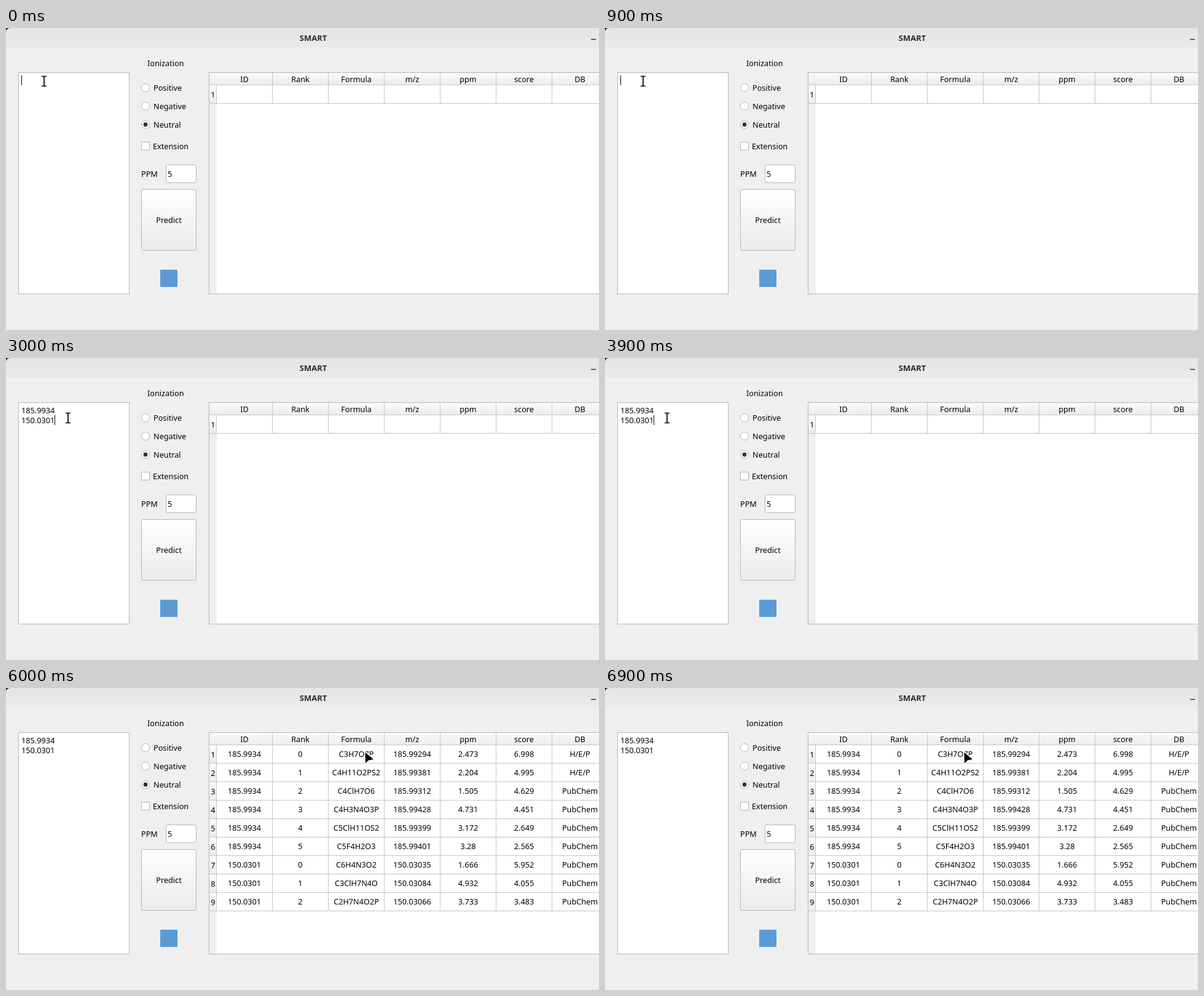
An HTML page that plays this animation: 965x491 px, repeating every 7500 ms.

```html
<!DOCTYPE html>
<html lang="en">
<head>
<meta charset="utf-8">
<title>Formula prediction</title>
<style>
  html, body { margin: 0; width: 100%; height: 100%; overflow: hidden; background: #efefef; }
  svg { display: block; }
  text { font: 12.7px "Noto Sans", "Open Sans", sans-serif; fill: #000; white-space: pre; }
  .mid { text-anchor: middle; }
  .title { font-weight: 700; font-size: 13px; fill: #2b2b2b; }
  .box { fill: #fff; stroke: #b5b5b5; }
  .grid { fill: none; stroke: #c6c6c6; }
</style>
</head>
<body>
<svg id="stage" width="965" height="491" viewBox="0 0 965 491">
  <defs>
    <linearGradient id="bar" x2="0" y2="1"><stop stop-color="#e5e5e5"/><stop offset="1" stop-color="#eaeaea"/></linearGradient>
    <linearGradient id="button" x2="0" y2="1"><stop stop-color="#fff"/><stop offset="1" stop-color="#ebebeb"/></linearGradient>
    <linearGradient id="hover" x2="0" y2="1"><stop stop-color="#fff"/><stop offset="1" stop-color="#f3f3f3"/></linearGradient>
    <linearGradient id="head" x2="0" y2="1"><stop stop-color="#fbfbfb"/><stop offset="1" stop-color="#ebebeb"/></linearGradient>
  </defs>
  <rect width="965" height="491" fill="#efefef"/>
  <rect width="8" height="8" fill="#111"/>
  <path d="M0 32V7Q0 0 7 0H965V32Z" fill="url(#bar)"/>
  <path d="M952 18.5h8" stroke="#2b2b2b" stroke-width="1.4"/>
  <rect class="box" x="20.5" y="72.5" width="180" height="360"/>
  <rect class="box" x="220.5" y="185.5" width="13" height="13"/>
  <rect class="box" x="260.5" y="222.5" width="49" height="29" rx="2"/>
  <rect class="box" id="predict" x="220.5" y="262.5" width="89" height="99" rx="2.5"/>
  <rect x="251" y="393" width="28" height="28" fill="#5b9bd5"/>
  <rect class="box" x="330.5" y="72.5" width="640" height="360"/>
  <rect x="331" y="73" width="634" height="20" fill="url(#head)"/>
  <rect x="331" y="93" width="12" height="339" fill="#efefef"/>
  <g id="labels"></g>
  <g id="table"></g>
  <g id="typed"></g>
  <path id="caret" d="M.5 0v16" stroke="#000"/>
  <path id="beam" d="M-4-7.5h3l1 1 1-1h3M0-6.5V7.5M-4 8.5h3l1-1 1 1h3" fill="none" stroke="#000" stroke-width="1.7"/>
  <path id="arrow" d="M0 0L.5 18 5.5 13 13.5 11.5Z" fill="#000" stroke="#fff" stroke-width="3" stroke-linejoin="round" paint-order="stroke"/>
</svg>
<script>
const $ = id => document.getElementById(id);
const label = (text, x, y, cls = "") => `<text x="${x}" y="${y}" class="${cls}">${text}</text>`;
const columnX = i => 388 + 91 * i;

const columns = ["ID", "Rank", "Formula", "m/z", "ppm", "score", "DB"];
const masses = ["185.9934", "150.0301"];
const results = `0 0 C3H7O7P 185.99294 2.473 6.998 H/E/P
0 1 C4H11O2PS2 185.99381 2.204 4.995 H/E/P
0 2 C4ClH7O6 185.99312 1.505 4.629 PubChem
0 3 C4H3N4O3P 185.99428 4.731 4.451 PubChem
0 4 C5ClH11OS2 185.99399 3.172 2.649 PubChem
0 5 C5F4H2O3 185.99401 3.28 2.565 PubChem
1 0 C6H4N3O2 150.03035 1.666 5.952 PubChem
1 1 C3ClH7N4O 150.03084 4.932 4.055 PubChem
1 2 C2H7N4O2P 150.03066 3.733 3.483 PubChem`.split("\n").map(line => {
  const [mass, ...rest] = line.split(" ");
  return [masses[mass], ...rest];
});

// caret, beam and arrow are positions; a missing one is hidden
const steps = [
  { lines: 0, caret: [25, 77], beam: [62, 86] },
  { lines: 1, caret: [79, 77], beam: [122, 86] },
  { lines: 2, caret: [79, 93], beam: [101, 97] },
  { lines: 2, caret: [79, 93], arrow: [276.5, 325], hover: true },
  { lines: 2, arrow: [584.5, 104.5], done: true }
];

function radio(name, y, checked) {
  const dot = checked ? `<circle cx="227" cy="${y}" r="3.4" fill="#333"/>` : "";
  return `<circle class="box" cx="227" cy="${y}" r="6.6"/>${dot}` + label(name, 240, y + 5);
}

function table(rows) {
  const bottom = 92.5 + 30 * rows.length;
  let lines = "M331 92.5H965M342.5 93V" + bottom;
  columns.forEach((_, i) => lines += `M${433.5 + 91 * i} 73V${bottom}`);
  let heads = "", texts = columns.map((name, i) => label(name, columnX(i), 88, "mid")).join("");
  rows.forEach((row, r) => {
    const y = 93 + 30 * r;
    lines += `M331 ${y + 29.5}H965`;
    heads += `<rect x="331" y="${y}" width="12" height="30" fill="url(#head)"/>`;
    texts += label(r + 1, 337, y + 20, "mid");
    row.forEach((cell, i) => texts += label(cell, columnX(i), y + 19, "mid"));
  });
  return `${heads}<path class="grid" d="${lines}"/>${texts}`;
}

function place(id, point) {
  $(id).setAttribute("visibility", point ? "visible" : "hidden");
  if (point) $(id).setAttribute("transform", `translate(${point})`);
}

function show(step) {
  $("table").innerHTML = table(step.done ? results : [[]]);
  $("typed").innerHTML = masses.slice(0, step.lines).map((m, i) => label(m, 25, 90 + 16 * i)).join("");
  $("predict").style.fill = step.hover ? "url(#hover)" : "url(#button)";
  for (const id of ["caret", "beam", "arrow"]) place(id, step[id]);
}

$("labels").innerHTML = label("SMART", 500, 21, "mid title") +
  label("Ionization", 230, 62) +
  radio("Positive", 97) + radio("Negative", 127) + radio("Neutral", 157, true) +
  label("Extension", 239, 197) + label("PPM", 220, 242) + label("5", 263, 242) +
  label("Predict", 265, 317, "mid");

let current = -1;
function tick() {
  const next = Math.floor(performance.now() / 1500) % steps.length;
  if (next !== current) show(steps[current = next]);
  requestAnimationFrame(tick);
}
tick();
</script>
</body>
</html>
```
